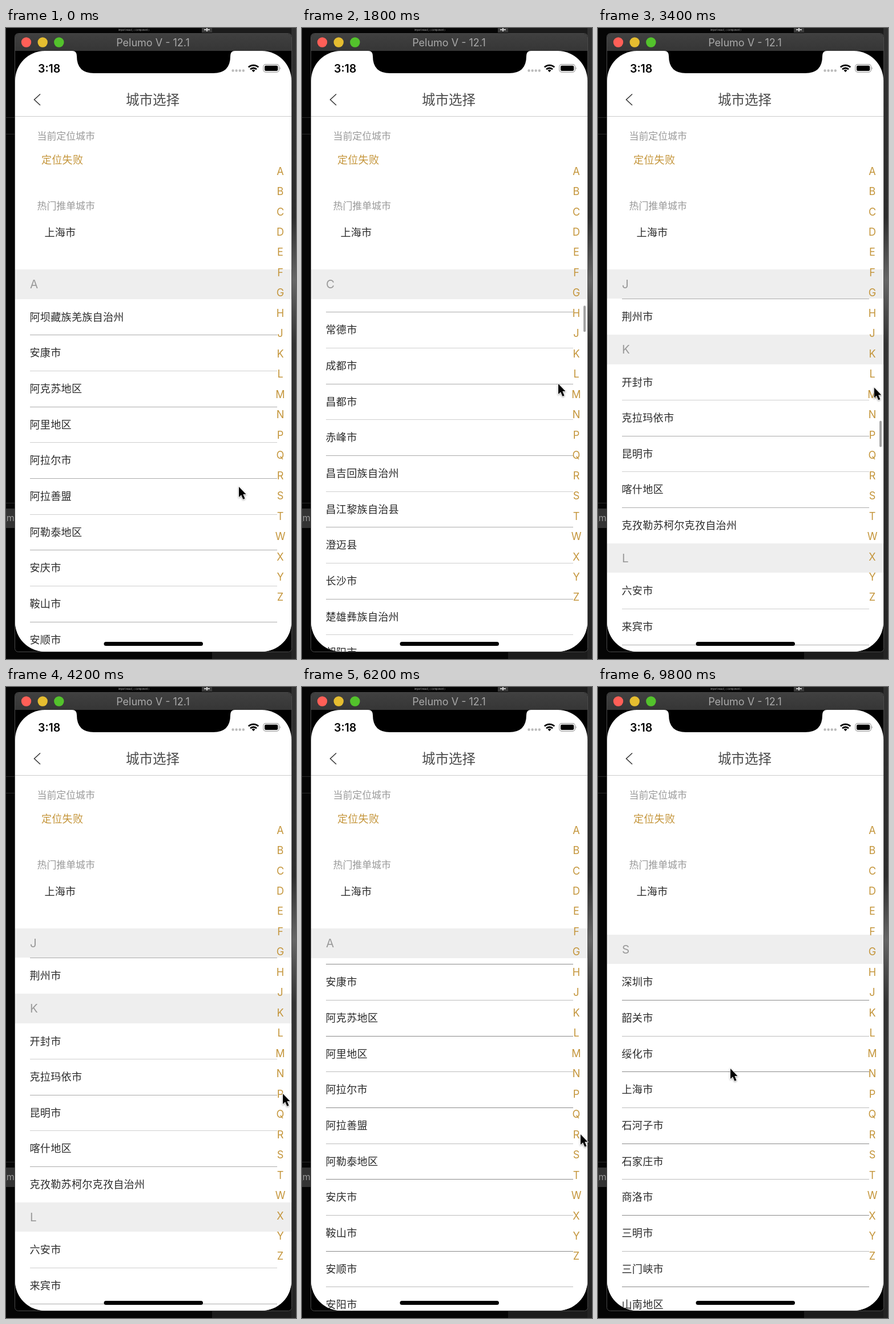
Write an HTML page that moves like this. It is 508 px wide and 1103 px high and loops after 10 s.

```html
<!DOCTYPE html>
<html lang="zh-CN">
<head>
<meta charset="utf-8">
<style>
  html, body { margin: 0; width: 508px; height: 1103px; overflow: hidden; background: #050505; }
  body { position: relative; font-family: Inter, "Noto Sans CJK SC", "Noto Sans CJK", sans-serif; }
  svg { position: absolute; left: 0; top: 0; }
  #list, #blank { position: absolute; left: 16px; top: 422px; width: 484px; height: 668px;
    overflow: hidden; isolation: isolate; border-radius: 0 0 52px 52px; background: #fff; }
  #list { --dark: #ababab; --light: #cfcfcf; }
  #list.sharp { --dark: #8a8a8a; --light: #bcbcbc; }
  h2 { position: sticky; top: 0; z-index: 1; margin: 0; padding-left: 26px; height: 51.59375px;
    font-size: 20.6px; font-weight: 400; line-height: 52px; color: #999; background: #eee; }
  p { box-sizing: border-box; margin: 0 0 0 25.5px; width: 433px; height: 62.65625px;
    font-size: 18.1px; letter-spacing: .25px; line-height: 62px; color: #2b2b2b; white-space: nowrap; }
  p + p { border-top: 1px solid var(--light); line-height: 61px; }
  p.dark { border-color: var(--dark); }
</style>
</head>
<body>
<svg width="508" height="1103">
  <defs>
    <linearGradient id="side" x2="0" y2="1">
      <stop offset="0" stop-color="#303030"/><stop offset=".3" stop-color="#2c2c2c"/>
      <stop offset=".4" stop-color="#666"/><stop offset=".45" stop-color="#4a4a4a"/>
      <stop offset=".5" stop-color="#333"/><stop offset="1" stop-color="#242424"/>
    </linearGradient>
    <linearGradient id="bar" x2="0" y2="1">
      <stop offset="0" stop-color="#404040"/><stop offset="1" stop-color="#363636"/>
    </linearGradient>
  </defs>
  <!-- desktop -->
  <rect width="508" height="1103" fill="#050505"/>
  <rect x="361" width="147" height="1103" fill="#1c1c1c"/>
  <rect x="500" width="8" height="1103" fill="url(#side)"/>
  <path d="M0 156.5H16M0 185.5H16M0 830.5H16" stroke="#2a2a2a"/>
  <rect y="840" width="16" height="34" fill="#333"/>
  <text x="-7" y="862" font-size="16" fill="#999">_m</text>
  <text x="197" y="5" font-size="4" fill="#bbb">import React, { Component }</text>
  <path d="M343 0h18v8h-18z" fill="#3a3a3a"/>
  <path d="M347 3h10M352 0v6" stroke="#ccc" stroke-width="2"/>
  <!-- window -->
  <rect x="15.5" y="9.5" width="485" height="1081" rx="6" stroke="#4a4a4a"/>
  <path d="M16 40V16q0-6 6-6H494q6 0 6 6V40z" fill="url(#bar)"/>
  <circle cx="35.5" cy="25" r="8.7" fill="#ff5f57"/>
  <circle cx="64.2" cy="25" r="8.7" fill="#e5bd30"/>
  <circle cx="92.8" cy="25" r="8.7" fill="#53c22c"/>
  <text x="257.5" y="32" font-size="18" fill="#a9a9a9" text-anchor="middle">Pelumo V - 12.1</text>
  <!-- screen -->
  <rect x="16" y="40" width="484" height="1050" rx="52" fill="#fff"/>
  <path d="M116 40q8 0 8 9q0 30 30 30H363q30 0 30-30q0-9 8-9z"/>
  <text x="56" y="77.5" font-size="19.5" font-weight="600">3:18</text>
  <path d="M397.5 74.5h18.5" stroke="#bbb" stroke-width="4.4" stroke-linecap="round" stroke-dasharray="0 6.1"/>
  <g fill="none" stroke="#000" stroke-width="2.8">
    <path d="M424.8 68.6a12.5 12.5 0 0 1 17.4 0M428 72.2a8 8 0 0 1 11 0"/>
    <path d="M433.5 77.2l-3-3.1a4.4 4.4 0 0 1 6 0z" fill="#000" stroke="none"/>
  </g>
  <rect x="450.8" y="63.7" width="27.5" height="13.4" rx="4" fill="none" stroke="#999" stroke-width="1.2"/>
  <rect x="453" y="65.8" width="23.2" height="9.2" rx="2.2"/>
  <path d="M479.7 68q2 2.4 0 4.8z" fill="#888"/>
  <path d="M60 115.5L49.5 125.2L60 135" fill="none" stroke="#333" stroke-width="1.5"/>
  <text x="257" y="133.5" font-size="23.5" font-weight="300" fill="#4a4a4a" text-anchor="middle">城市选择</text>
  <path d="M16 154.5H500" stroke="#ccc"/>
  <g font-size="16.9" fill="#999">
    <text x="54.5" y="195.3">当前定位城市</text>
    <text x="54.5" y="316.5">热门推单城市</text>
  </g>
  <g font-size="18.1" letter-spacing=".2">
    <text x="62" y="236.8" fill="#c4953a">定位失败</text>
    <text x="67.5" y="364.2" fill="#2b2b2b">上海市</text>
  </g>
</svg>
<div id="list"></div>
<div id="blank"><h2>H</h2></div>
<svg width="508" height="1103">
  <rect id="thumb" x="493" y="422" width="4" height="46" rx="2" fill="#000" fill-opacity=".36"/>
  <g id="index" font-size="18" fill="#c4953a" text-anchor="middle"></g>
  <rect x="171.5" y="1073" width="173.5" height="7" rx="3.5"/>
  <path id="cursor" d="M0 0V18L4.1 14.2L7.3 21.8L10.5 20.4L7.3 13H12.5z" stroke="#fff" stroke-width="1.5"
    paint-order="stroke" style="filter:drop-shadow(0 1.5px 1.5px #0006)"/>
</svg>
<script>
const cities = `A 阿坝藏族羌族自治州 安康 阿克苏地区 阿里地区 阿拉尔 阿拉善盟 阿勒泰地区 安庆 鞍山 安顺 安阳
B 北京 保定 包头 宝鸡 蚌埠 本溪 毕节 滨州 亳州 百色 北海 巴中 白城 白山 白银 保山 巴彦淖尔 北屯 巴音郭楞蒙古自治州 博尔塔拉蒙古自治州 白沙黎族自治县
C 重庆 常德 成都 昌都 赤峰 昌吉回族自治州 昌江黎族自治县 澄迈县 长沙 楚雄彝族自治州 朝阳 沧州 长治 常州 滁州 池州 郴州 长春 潮州 承德 崇左
D 大连 东莞 德州 东营 大同 大庆 丹东 德阳 达州 定西 儋州 大理白族自治州 定安县 东方
E 鄂尔多斯 鄂州 恩施土家族苗族自治州
F 福州 佛山 抚顺 阜阳 阜新 抚州 防城港
G 广州 贵阳 桂林 赣州 广安 广元 贵港 固原 甘南藏族自治州 甘孜藏族自治州 果洛藏族自治州
H 杭州 合肥 哈尔滨 海口 邯郸 呼和浩特 惠州 湖州 淮安 衡阳 怀化 黄石 黄冈 鹤壁 河源 衡水 菏泽 淮南 淮北 黄山 葫芦岛 鹤岗 黑河 河池 贺州 汉中 哈密 海东
J 济南 嘉兴 金华 九江 吉林 江门 揭阳 济宁 焦作 锦州 晋城 晋中 吉安 景德镇 嘉峪关 酒泉 金昌 佳木斯 鸡西 荆门 济源 荆州
K 开封 克拉玛依 昆明 喀什地区 克孜勒苏柯尔克孜自治州
L 六安 来宾 兰州 洛阳 柳州 临沂 廊坊 连云港 聊城 丽水 龙岩 泸州 乐山 拉萨 丽江 临汾 吕梁 辽阳 辽源 娄底 漯河 陇南 六盘水 林芝 临沧
M 绵阳 马鞍山 茂名 梅州 牡丹江 眉山
N 南京 宁波 南宁 南昌 南通 南充 南阳 宁德 南平 内江 那曲地区
P 莆田 平顶山 濮阳 盘锦 萍乡 攀枝花 平凉 普洱
Q 青岛 泉州 秦皇岛 清远 曲靖 衢州 齐齐哈尔 七台河 钦州 庆阳 琼海
R 日照 日喀则
S 深圳 韶关 绥化 上海 石河子 石家庄 商洛 三明 三门峡 山南地区 苏州 沈阳 绍兴 汕头 三亚 十堰 宿迁 宿州 商丘 上饶
T 天津 太原 唐山 台州 泰州 泰安 铁岭 通化 通辽 铜陵 天水
W 武汉 无锡 温州 潍坊 芜湖 威海 乌鲁木齐 梧州 渭南 吴忠
X 西安 厦门 徐州 襄阳 新乡 湘潭 许昌 咸阳 邢台 西宁 锡林郭勒盟
Y 扬州 烟台 宜昌 盐城 银川 岳阳 宜宾 延安 榆林 营口 玉林 运城
Z 郑州 珠海 中山 湛江 株洲 镇江 淄博 肇庆 漳州 舟山 遵义 周口`;

// Heights are whole 64ths of a pixel, so layout adds them up without rounding
const HEAD = 51.59375, ROW = 62.65625;
const $ = id => document.getElementById(id);
const list = $("list"), tops = {}, sections = {};
let height = 0;

cities.split("\n").forEach((line, n) => {
  const [letter, ...names] = line.split(" ");
  const shift = "KL".includes(letter) ? 1 : 0;
  const rows = names.map((name, i) =>
    `<p class="${(i + shift) % 2 ? "dark" : ""}">${/(自治州|县|地区|盟)$/.test(name) ? name : name + "市"}</p>`);
  const section = document.createElement("section");
  section.innerHTML = `<h2>${letter}</h2>${rows.join("")}`;
  list.append(section);
  sections[letter] = section;
  tops[letter] = height;
  height += HEAD + names.length * ROW;
  $("index").innerHTML += `<text x="480.5" y="${256.6 + n * 35.47}">${letter}</text>`;
});

const inC = tops.C + 40.3, endC = tops.C + 7 * ROW, atK = tops.K - HEAD - ROW;
const scrollKeys = [[0, 0], [200, 0], [1800, inC], [2600, endC], [3400, atK], [4400, atK],
  [5200, HEAD], [7800, HEAD], [8000, tops.S - 10.6]];
const cursorKeys = [[0, 408, 802], [600, 408, 802], [1800, 449, 622], [2600, 483, 575], [2800, 483, 575],
  [4200, 485, 711], [6200, 488, 782], [8200, 485, 823], [8600, 485, 823], [9800, 232, 667]];

// Eased value of a keyframe column at time t
function at(keys, t, col = 1) {
  const i = keys.findIndex(k => k[0] > t);
  if (i < 0) return keys[keys.length - 1][col];
  const a = keys[i - 1], b = keys[i], p = (t - a[0]) / (b[0] - a[0]);
  return a[col] + (b[col] - a[col]) * p * p * (3 - 2 * p);
}

function draw(now) {
  const t = Math.floor(now % 10000 / 200) * 200;
  const y = at(scrollKeys, t);
  list.scrollTop = Math.round(y);
  list.className = t >= 5200 ? "sharp" : "";
  sections.R.style.visibility = t >= 8000 ? "hidden" : "";
  $("blank").style.display = t >= 8000 && t < 8800 ? "" : "none";
  $("thumb").setAttribute("y", 422 + y * .0294);
  $("thumb").style.display = t >= 200 && t <= 3600 || t > 4400 && t <= 5400 ? "" : "none";
  $("cursor").setAttribute("transform", `translate(${at(cursorKeys, t)} ${at(cursorKeys, t, 2)})`);
}

const start = performance.now();
function tick() {
  draw(performance.now() - start);
  requestAnimationFrame(tick);
}
tick();
</script>
</body>
</html>
```
